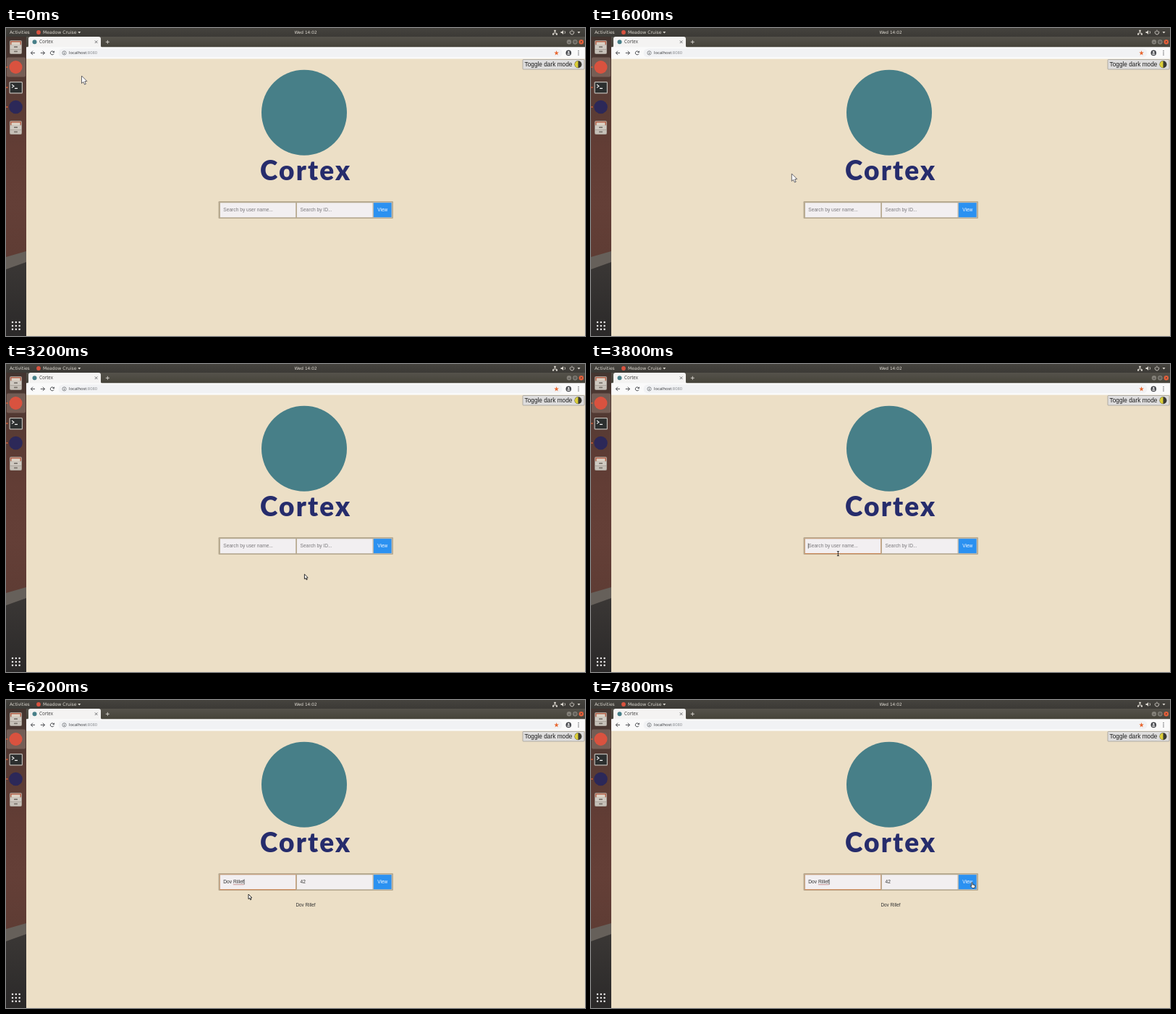
These frames come from a looping animation (800x425 px, 8 s). An HTML page with a canvas:

```html
<!DOCTYPE html>
<html lang="en">
<head>
<meta charset="utf-8">
<title>Cortex</title>
<style>
html, body { margin: 0; width: 100%; height: 100%; overflow: hidden; background: #ecdfc6; }
canvas { display: block; width: 800px; height: 425px; }
</style>
</head>
<body>
<canvas id="stage"></canvas>
<script>
const canvas = document.getElementById('stage');
const ctx = canvas.getContext('2d');
const dpr = window.devicePixelRatio || 1;
canvas.width = 800 * dpr;
canvas.height = 425 * dpr;
ctx.scale(dpr, dpr);

const LOOP = 8000, STEP = 200;
const UI = '"Open Sans", sans-serif';
const BAR = '"DejaVu Sans", sans-serif';
const PAGE = '"Liberation Sans", Arial, sans-serif';
const USER = 'Dov Rillef';

function rect(x, y, w, h, fill, r = 0) {
  ctx.fillStyle = fill;
  ctx.beginPath();
  ctx.roundRect(x, y, w, h, r);
  ctx.fill();
}

function frame(x, y, w, h, color, lw = 1, r = 0) {
  ctx.strokeStyle = color;
  ctx.lineWidth = lw;
  ctx.beginPath();
  ctx.roundRect(x, y, w, h, r);
  ctx.stroke();
}

function disc(x, y, r, fill) {
  ctx.fillStyle = fill;
  ctx.beginPath();
  ctx.arc(x, y, r, 0, 7);
  ctx.fill();
}

function arc(x, y, r, color, lw, from = 0, to = Math.PI * 2) {
  ctx.strokeStyle = color;
  ctx.lineWidth = lw;
  ctx.beginPath();
  ctx.arc(x, y, r, from, to);
  ctx.stroke();
}

function text(s, x, y, font, fill, align = 'left') {
  ctx.font = font;
  ctx.fillStyle = fill;
  ctx.textAlign = align;
  ctx.fillText(s, x, y);
  return ctx.measureText(s).width;
}

function path(d, fill, stroke, lw = 1) {
  const p = new Path2D(d);
  if (fill) { ctx.fillStyle = fill; ctx.fill(p); }
  if (stroke) { ctx.strokeStyle = stroke; ctx.lineWidth = lw; ctx.stroke(p); }
}

function fade(y0, y1, ...colors) {
  const g = ctx.createLinearGradient(0, y0, 0, y1);
  colors.forEach((c, i) => g.addColorStop(i / (colors.length - 1), c));
  return g;
}

function topBar() {
  rect(0, 0, 800, 12, fade(0, 12, '#45433e', '#3c3a36'));
  const ink = '#dedad2';
  text('Activities', 5, 8.2, '6.1px ' + BAR, ink);
  disc(45, 6, 2.9, '#d9523f');
  text('Meadow Cruise', 51, 8.2, '6.1px ' + BAR, ink);
  path('M99.3 5h4l-2 2.4z', ink);
  text('Wed 14:02', 414, 8.2, '5.8px ' + BAR, ink, 'center');
  path('M758.5 5v2M756 8.5V7h5v1.5', null, ink, 0.8);
  rect(757.3, 2.8, 2.4, 2.2, ink);
  rect(755, 7.6, 2.2, 2, ink);
  rect(759.8, 7.6, 2.2, 2, ink);
  path('M766.5 5h1.6l2-2v6l-2-2h-1.6z', ink);
  arc(770, 6, 2.6, ink, 0.8, -0.8, 0.8);
  arc(782, 6.2, 2.7, ink, 0.9, -0.9, 4.04);
  path('M782 2.6v3', null, ink, 0.9);
  path('M789.5 5h4l-2 2.4z', ink);
}

function drawer(y) {
  rect(5, y - 9, 17, 19, '#a9a198', 2);
  rect(6, y - 8, 15, 5, '#b5624a', 1);
  rect(7.5, y - 6.5, 12, 4, '#dcd3c6');
  rect(6, y - 2.5, 15, 5.5, '#cfc9c1', 0.8);
  rect(6, y + 3.8, 15, 5.2, '#c6c0b8', 0.8);
  rect(11, y - 0.8, 5, 1.8, '#7b746d', 0.6);
  rect(11, y + 5.4, 5, 1.8, '#7b746d', 0.6);
}

function dock() {
  rect(0, 12, 28, 413, fade(12, 320, '#433530', '#583b34', '#623d35', '#643f37', '#5e3c34'));
  path('M0 316L28 308V425H0z', '#66605a');
  path('M0 333L28 323V425H0z', fade(325, 425, '#3a3735', '#2b2929'));
  rect(1, 40.5, 26, 27, 'rgba(215,190,175,.28)', 2);
  drawer(26);
  disc(13.5, 54, 9, '#d9523f');
  rect(4.5, 74, 18.5, 16.5, '#bdb9b3', 1.5);
  rect(5.7, 75.2, 16.1, 14.1, '#2c2f2f', 0.6);
  path('M8 78l3 2.2L8 82.4M12 83.4h4', null, '#f2f2f2', 1.1);
  disc(13.5, 109, 9.3, '#2c2858');
  drawer(137);
  for (const y of [54, 82, 109]) disc(1.4, y, 1.1, '#e0623a');
  for (let i = 0; i < 9; i++) {
    disc(9 + (i % 3) * 4.8, 406 + Math.floor(i / 3) * 4.9, 1.25, '#f0eeee');
  }
}

function browser() {
  rect(28, 12, 772, 15, fade(12, 27, '#55524b', '#454339'));
  path('M29 27Q31 27 31 24V15Q31 12 34 12H128Q131 12 131 15V24Q131 27 133 27z', '#f4f3f2');
  disc(39.5, 19.3, 3, '#477f88');
  text('Cortex', 46, 21.4, '6.2px ' + UI, '#3c3c3c');
  path('M122.8 17.4l3.6 3.6m0-3.6l-3.6 3.6', null, '#55565a', 0.8);
  path('M137.8 19.3h5M140.3 16.8v5', null, '#dcd9d2', 0.9);
  [['#85827a', 778], ['#85827a', 786.3], ['#e9603a', 794.8]].forEach(([c, x]) => disc(x, 19.2, 3.2, c));
  path('M776.5 19.8h3M793.6 18l2.4 2.4m0-2.4l-2.4 2.4', null, '#3b3935', 0.7);
  frame(785.1, 18, 2.4, 2.4, '#3b3935', 0.7);

  rect(28, 26.2, 772, 16.3, '#fafafa');
  rect(72.5, 28.6, 696, 11.6, '#f1f2f4', 5.8);
  const ink = '#4b4d51';
  path('M40 34.4H34.6M37 31.7l-2.7 2.7 2.7 2.7M47.8 34.4h5.4M50.8 31.7l2.7 2.7-2.7 2.7', null, ink, 1);
  arc(63.8, 34.4, 2.5, ink, 1, 0.4, 5.5);
  path('M66.9 31.3v2.8h-2.8z', ink);
  arc(80.5, 34.4, 2.6, '#5f6368', 0.7);
  path('M80.5 34v2M80.5 32.7v.7', null, '#5f6368', 0.8);
  const w = text('localhost', 87, 36.3, '5.8px ' + UI, '#2d2f33');
  text(':8080', 87 + w, 36.3, '5.8px ' + UI, '#85888d');

  ctx.beginPath();
  for (let i = 0; i < 10; i++) {
    const a = -Math.PI / 2 + i * Math.PI / 5, r = i % 2 ? 1.4 : 3.5;
    ctx.lineTo(760.6 + r * Math.cos(a), 34.6 + r * Math.sin(a));
  }
  ctx.fillStyle = '#e8662f';
  ctx.fill();
  disc(777.3, 34.4, 3.8, '#45474c');
  disc(777.3, 33.2, 1.3, '#f4f4f4');
  rect(775.2, 35.2, 4.2, 1.6, '#f4f4f4', 0.8);
  for (const y of [31.8, 34.4, 37]) disc(791, y, 0.75, ink);
}

function page() {
  rect(28, 42.5, 772, 382.5, '#ecdfc6');
  rect(714, 43.5, 85, 13.5, '#dedddd', 0.8);
  frame(714, 43.5, 85, 13.5, '#aaa59d', 0.9, 0.8);
  text('Toggle dark mode', 716.5, 53.2, '8.3px ' + PAGE, '#1d1d1d');
  disc(790.5, 50.2, 5, '#3a3a34');
  ctx.fillStyle = '#dccf3a';
  ctx.beginPath();
  ctx.arc(790.5, 50.2, 4.7, Math.PI / 2, Math.PI * 1.5);
  ctx.fill();

  disc(412, 116.8, 59, '#477f88');
  ctx.letterSpacing = '2.2px';
  text('Cortex', 351, 210.4, '900 37px Lato, sans-serif', '#262c6c');
  ctx.letterSpacing = '0px';
}

function form(t) {
  const font = '6.65px ' + PAGE;
  const focused = t >= 3800;
  const filled = t >= 6000;
  let typed = '';
  if (t >= 5000) typed = 'D';
  if (t >= 5400) typed = USER.slice(0, 3);
  if (t >= 5800) typed = USER.slice(0, 6);
  if (filled) typed = USER;

  rect(293.5, 239, 241.5, 24, '#b8ab92', 1.2);
  rect(296, 241.2, 104.2, 20, '#f2eff1');
  rect(402, 241.2, 104.6, 20, '#f2eff1');
  rect(507.8, 241, 25, 20.3, '#2b91f1');
  frame(507.6, 240.8, 25.4, 20.7, '#c9cbc8', 0.5);
  if (focused) {
    frame(295.4, 240.7, 105.1, 20.9, '#cfa27e', 0.9, 0.8);
    path('M295.2 261.6H400.6', null, '#d08a5a', 1);
  }

  let caret = 300.3;
  if (typed) {
    caret += text(typed, 300.3, 253.3, font, '#333') + 0.5;
  } else {
    text('Search by user name...', 300.3, 253.3, font, '#7b797c');
  }
  const blink = typed || t < 4400 || t >= 4800;
  if (focused && blink) path(`M${caret} 247.4v7.2`, null, '#333', 0.7);
  if (filled) {
    const x = 300.3 + ctx.measureText(USER.slice(0, 4)).width;
    path(`M${x} 254.7H${caret - 0.5}`, null, '#a65b5b', 0.6);
  }
  text(filled ? '42' : 'Search by ID...', 406.6, 253.3, font, filled ? '#333' : '#7b797c');
  text('View', 520.3, 253.3, '6.6px ' + PAGE, '#f4f8ff', 'center');
  if (t >= 5400) text(USER, 414, 284.8, '6.3px ' + PAGE, '#333', 'center');
}

// time, x, y, shape
const track = [
  [0, 104.5, 66, 'big'], [800, 104.5, 66, 'big'], [1000, 122, 80, 'big'],
  [1600, 277.3, 201, 'big'], [1800, 303, 217, 'big'], [2000, 318.3, 225, 'big'],
  [2200, 338, 236, 'big'], [2400, 392, 258, 'beam'], [2600, 446, 280, 'small'],
  [2800, 496, 297, 'small'], [3000, 464, 298, 'small'], [3200, 412.4, 290, 'small'],
  [3400, 368, 274, 'small'], [3600, 343, 260, 'beam'], [3800, 341.4, 261.6, 'beam'],
  [6000, 341.4, 261.6, 'beam'], [6200, 335, 268, 'small'], [6400, 335, 268, 'small'],
  [6800, 385, 274, 'small'], [7200, 472, 268, 'small'], [7400, 508, 259, 'hand'],
  [7600, 525.8, 251.5, 'hand'], [8000, 525.8, 251.5, 'hand']
];

function pointer(t) {
  const i = track.findIndex(k => k[0] > t);
  const a = track[i - 1], b = track[i];
  const u = (t - a[0]) / (b[0] - a[0]);
  const shape = a[3];
  const big = shape === 'big';
  ctx.save();
  ctx.translate(a[1] + (b[1] - a[1]) * u, a[2] + (b[2] - a[2]) * u);
  ctx.lineJoin = 'round';
  if (shape === 'beam') {
    path('M-1.5-3H1.5M0-3V3M-1.5 3H1.5', null, '#222', 0.9);
  } else if (shape === 'hand') {
    path('M0 0.6Q.8-.6 1.4.6V3.2L4.8 4V6L4 8H1L-1.4 5.2Q-1.2 4 0 5z', '#f6f6f6', '#222', 0.8);
  } else {
    if (!big) ctx.scale(0.65, 0.65);
    path('M0 0V10.4L2.4 8.3 4.1 12 5.9 11.2 4.3 7.7 7.4 7.4z', '#fff', big ? '#55555c' : '#1c1c1c', big ? 0.9 : 1.4);
  }
  ctx.restore();
}

const start = performance.now();
let shown = -1;

function draw() {
  const now = performance.now() - start;
  const t = Math.floor((now % LOOP) / STEP) * STEP;
  if (t !== shown) {
    shown = t;
    page();
    browser();
    dock();
    topBar();
    form(t);
    pointer(t);
  }
  requestAnimationFrame(draw);
}

draw();
</script>
</body>
</html>
```
